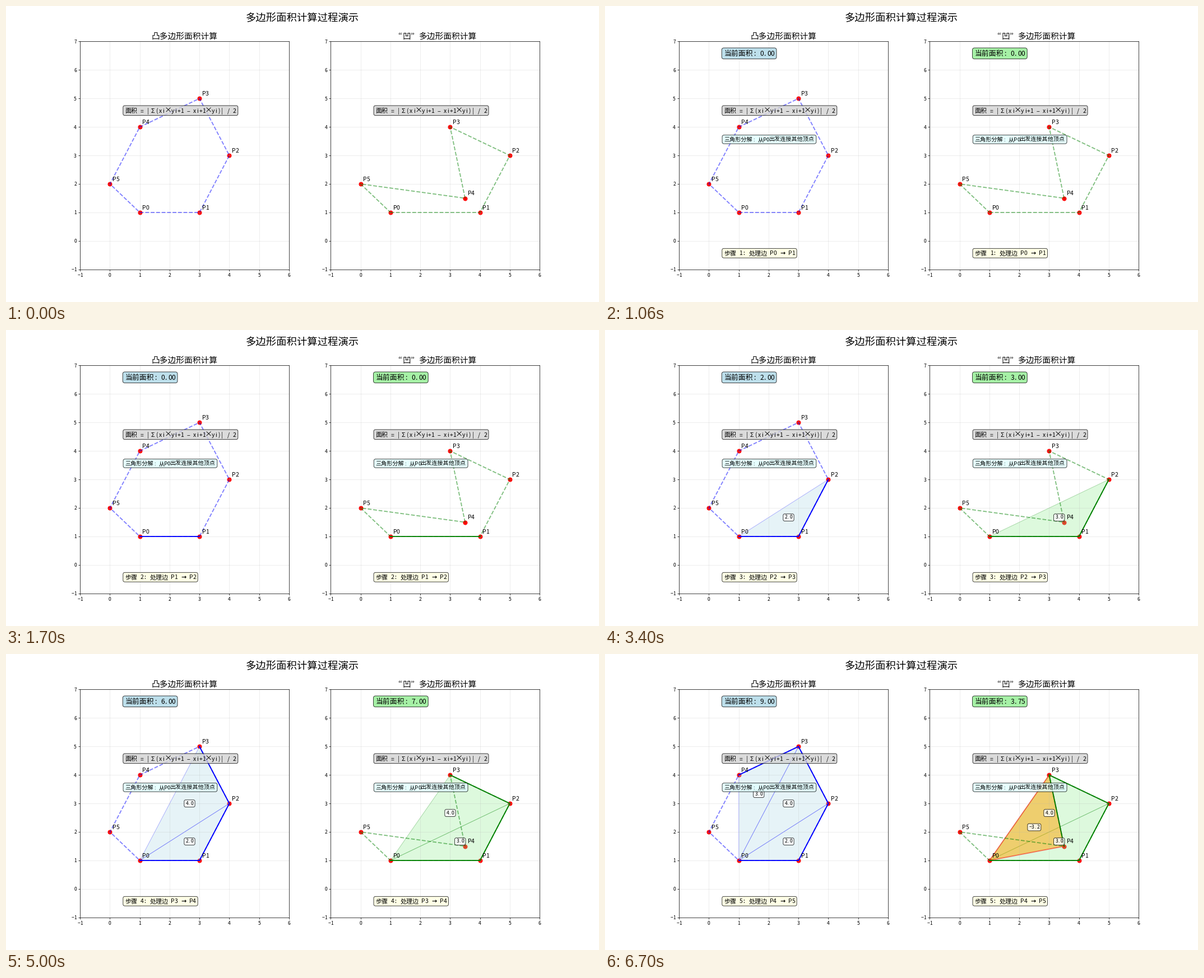
Animation of 1058 by 529 pixels, one loop 8000 ms. Source, as a matplotlib script:

```python
from itertools import groupby

import matplotlib.pyplot as plt
import numpy as np
from matplotlib.animation import FuncAnimation
from matplotlib.patches import FancyBboxPatch
from matplotlib.textpath import TextPath

W, H, DPI = 1058, 529, 66.125
FRAME_MS, FRAMES = 100, 80
STEP_STARTS = [1, 17, 34, 50, 67]
STEPS = range(1, len(STEP_STARTS) + 1)

plt.rcParams["font.family"] = ["Noto Sans CJK JP", "DejaVu Sans"]

fig = plt.figure(figsize=(W / DPI, H / DPI), dpi=DPI, facecolor="white")
panels = fig.subplots(1, 2)

# Overlay in pixel units, y down, for all lettering
stage = fig.add_axes([0, 0, 1, 1], zorder=5)
stage.set(xlim=(0, W), ylim=(H, 0))
stage.axis("off")

LATIN = {}
ARROW = {"family": "DejaVu Sans", "weight": "bold"}
SCALE = {"×": 1.2, "Σ": 1, "→": 1, "“": 1, "”": 1}
PLACE = {"“": 0.72, "”": 0.25, ".": 0.32}

timed = []  # (artist, first step, last step)


def during(artists, first, last=99):
    timed.extend((a, first, last) for a in artists)


def em_size(pt):
    return pt * DPI / 72


def cell(c):
    return 0.5 if c.isascii() else 1


def text_width(s, pt):
    return em_size(pt) * sum(map(cell, s))


def put(x, y, s, pt, font=LATIN):
    return stage.text(x, y, s, fontsize=pt, zorder=3, **font)


def write(x, y, s, pt, align=0.0):
    """Set text on half/full em cells; y is the baseline."""
    em = em_size(pt)
    x -= align * text_width(s, pt)
    out = []
    for cjk, group in groupby(s, lambda c: ord(c) >= 0x3000):
        run = "".join(group)
        if cjk:
            out.append(put(x, y + 0.04 * em, run, pt))
            x += em * len(run)
            continue
        for c in run:
            w = em * cell(c)
            if c != " ":
                font = ARROW if c == "→" else LATIN
                glyph = "−" if c == "-" else c
                scale = SCALE.get(c, 0.94)
                ink = TextPath((0, 0), glyph, size=em * scale,
                               prop=font or None).get_extents()
                left = x + PLACE.get(c, 0.5) * w - (ink.x0 + ink.x1) / 2
                out.append(put(left, y, glyph, pt * scale, font))
            x += w
    return out


def boxed(x, y, s, pt, color, ascent=0.79, descent=0.14, centered=False):
    em = em_size(pt)
    w = text_width(s, pt)
    if centered:
        x -= w / 2
        y += (ascent - descent) / 2 * em
    box = FancyBboxPatch((x, y - ascent * em), w, (ascent + descent) * em,
                         boxstyle=f"round,pad={0.3 * em}", facecolor=color,
                         edgecolor="black", lw=1, alpha=0.8, zorder=3)
    stage.add_patch(box)
    return [box] + write(x, y, s, pt)


def pixel(ax, x, y):
    p = ax.get_position()
    return (W * (p.x0 + p.width * (x + 1) / 7),
            H * (1 - p.y0 - p.height * (y + 1) / 8))


def draw_axes(ax, title):
    ax.set(xlim=(-1, 6), ylim=(-1, 7),
           xticks=range(-1, 7), yticks=range(-1, 8))
    ax.tick_params(labelbottom=False, labelleft=False)
    ax.grid(True, alpha=0.3)
    for v in range(-1, 7):
        x, y = pixel(ax, v, -1)
        write(x, y + 13.6, str(v), 10, align=0.5)
    for v in range(-1, 8):
        x, y = pixel(ax, -1, v)
        write(x - 6.4, y + 3.4, str(v), 10, align=1)
    x, y = pixel(ax, 2.5, 7)
    write(x, y - 5.5, title, 16, align=0.5)


def signed_area(a, b, c):
    return ((b[0] - a[0]) * (c[1] - a[1]) - (c[0] - a[0]) * (b[1] - a[1])) / 2


def draw_panel(ax, title, points, line, tint):
    pts = np.array(points, float)
    loop = np.vstack([pts, pts[:1]])
    ax.scatter(*pts.T, s=60, color="red", zorder=1)
    ax.plot(*loop.T, "--", color=line, lw=2, alpha=0.5)
    draw_axes(ax, title)

    for i, (x, y) in enumerate(pts):
        write(*pixel(ax, x + 0.1, y + 0.1), f"P{i}", 12)
    boxed(*pixel(ax, 0.5, 4.5), "面积 = |Σ(xi×yi+1 - xi+1×yi)| / 2", 12,
          "lightgray", ascent=0.86)

    # Edges and fan triangles accumulate step by step
    areas = [0, 0]
    for i in range(len(pts) - 2):
        during(ax.plot(*pts[i:i + 2].T, color=line, lw=2), i + 2)
        if i == 0:
            continue
        tri = pts[[0, i, i + 1]]
        area = signed_area(*tri)
        areas.append(areas[-1] + area)
        if area > 0:
            style = dict(facecolor=tint, edgecolor=line, lw=1, alpha=0.3)
        else:
            style = dict(facecolor="orange", edgecolor="red", lw=2, alpha=0.5)
        during(ax.fill(*tri.T, **style), i + 2)
        during(boxed(*pixel(ax, *tri.mean(axis=0)), f"{area:.1f}", 10, "white",
                     ascent=0.66, descent=0.13, centered=True), i + 2)

    during(boxed(*pixel(ax, 0.5, 3.5), "三角形分解: 从P0出发连接其他顶点", 11,
                 "lightcyan"), 1)
    for step in STEPS:
        during(boxed(*pixel(ax, 0.5, -0.5),
                     f"步骤 {step}: 处理边 P{step - 1} → P{step}", 12,
                     "lightyellow"), step, step)
        during(boxed(*pixel(ax, 0.5, 6.5), f"当前面积: {areas[step - 1]:.2f}",
                     14, tint), step, step)


write(W / 2, 26.3, "多边形面积计算过程演示", 20, align=0.5)
draw_panel(panels[0], "凸多边形面积计算",
           [(1, 1), (3, 1), (4, 3), (3, 5), (1, 4), (0, 2)],
           "blue", "lightblue")
draw_panel(panels[1], "“凹”多边形面积计算",
           [(1, 1), (4, 1), (5, 3), (3, 4), (3.5, 1.5), (0, 2)],
           "green", "lightgreen")


def show(frame):
    step = np.searchsorted(STEP_STARTS, frame, side="right")
    for artist, first, last in timed:
        artist.set_visible(first <= step <= last)
    return [a for a, _, _ in timed]


anim = FuncAnimation(fig, show, frames=FRAMES, interval=FRAME_MS,
                     init_func=lambda: show(0), repeat=True, repeat_delay=0)
plt.show()
```
